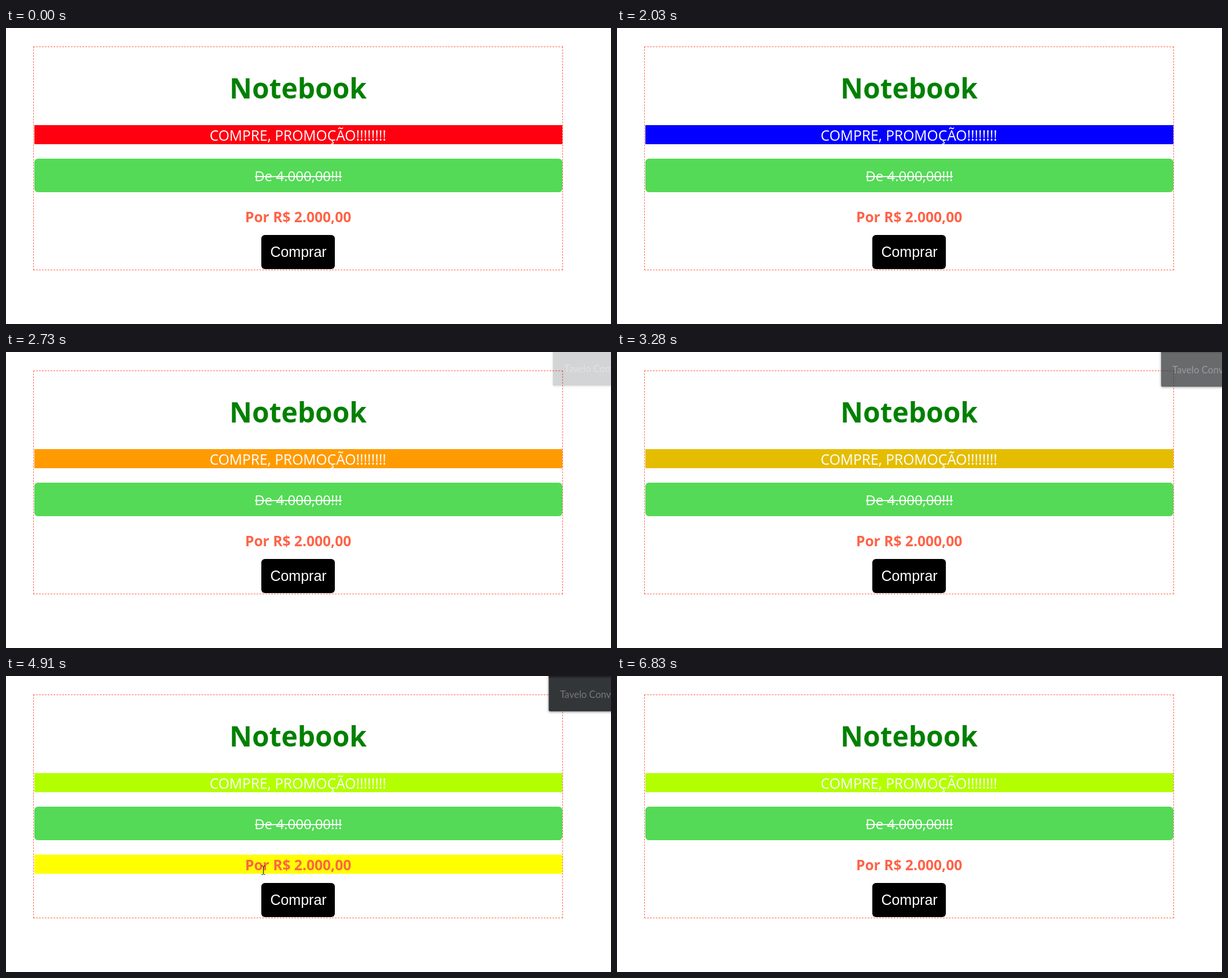
Write an HTML page that moves like this. It is 1045x512 px and loops after 6920 ms.

```html
<!DOCTYPE html>
<html lang="pt-BR">
<head>
<meta charset="utf-8">
<title>Notebook</title>
<style>
  html, body { margin: 0; width: 100%; height: 100%; overflow: hidden; background: #fff; }
  #card { position: absolute; box-sizing: border-box; left: 47px; top: 32px; width: 915px; height: 387px; border: 1px dashed tomato; }
  svg { position: absolute; left: 0; top: 0; }
  text { font-family: "Open Sans", "Noto Sans", sans-serif; font-size: 24.6px; fill: #fff; }
  .word, .label { text-anchor: middle; }
  .bold { font-weight: 700; }
  .label { font-family: "Liberation Sans", Arial, sans-serif; font-size: 25px; }
  #toast text { font-family: Lato, sans-serif; font-size: 16.5px; fill: #75777b; }
</style>
</head>
<body>
<div id="card"></div>
<svg width="1045" height="512" viewBox="0 0 1045 512">
  <text class="word bold" x="504.6" y="121.5" style="font-size:47.9px;fill:green">Notebook</text>

  <rect id="bar" x="49" y="168" width="912" height="33"/>
  <text class="word" x="504.3" y="195">COMPRE, PROMOÇÃO!!!!!!!!</text>

  <rect x="49" y="226" width="912" height="58" rx="6.25" fill="#54da56"/>
  <text class="word" x="504.8" y="265" style="font-size:24px">De 4.000,00!!!</text>
  <rect x="430" y="256" width="150" height="2" fill="#fff"/>

  <rect id="glow" x="49" y="309" width="912" height="33" fill="#ff0"/>
  <text class="word bold" x="504.6" y="336" style="fill:tomato">Por R$ 2.000,00</text>

  <rect id="button" x="441" y="358" width="127" height="59" rx="6.25"/>
  <rect id="hover" x="443" y="360" width="123" height="55" rx="4" fill="#444"/>
  <text class="label" x="505" y="396">Comprar</text>

  <g id="toast">
    <rect x="937.5" y="-10" width="130" height="71" rx="2" fill="#333639" style="filter:drop-shadow(0 1px 2px #0008)"/>
    <rect x="937.5" y="0" width="130" height="3" fill="#232528"/>
    <text x="957" y="37.5">Tavelo Converter</text>
  </g>

  <g id="pointer" stroke-linejoin="round">
    <path id="arrow" d="M.5.5V16L4 12.6 6.5 18.3 8.8 17.3 6.4 11.7H11.5Z" fill="#fff" stroke="#000"/>
    <path id="beam" d="M-3-7.5H-1L0-6.5 1-7.5H3M0-6.5V6.5M-3 7.5H-1L0 6.5 1 7.5H3" fill="none" stroke="#000"/>
    <path id="hand" d="M-1.5 13V2Q0-.5 1.5 2V8Q4 6.5 4.5 8.5 7 7.5 7.5 9.5 10 9 10 11.5V16L8 21.5H-1L-5.5 14Q-5.5 11-1.5 14Z" fill="#fff" stroke="#000"/>
  </g>
  <rect id="blank" width="1045" height="512" fill="#1a1b1c"/>
</svg>
<script>
const LOOP = 6920, FADE = 240;
const $ = id => document.getElementById(id);
const show = (id, on) => $(id).setAttribute('visibility', on ? 'visible' : 'hidden');
const ramp = (t, from, to) => Math.min(1, Math.max(0, (t - from) / (to - from)));
const mix = (a, b, k) => a + (b - a) * k;

const barFades = [
  { at: 1710, to: [4, 0, 255] },
  { at: 2260, to: [255, 155, 0] },
  { at: 3200, to: [179, 255, 0] }
];

// time, x, y at the turning points of each visit
const visits = [
  [[150, 403, 269], [380, 113, 0]],
  [[4060, 520, 87], [4450, 438, 356], [4690, 442, 333], [4910, 444.5, 336], [5060, 444.5, 336],
   [5450, 492, 385], [5830, 492, 385], [5910, 535, 401], [6060, 535, 401], [6450, 880, 482]]
];

function barColour(t) {
  const rgb = barFades.reduce(
    (c, { at, to }) => c.map((v, i) => mix(v, to[i], ramp(t, at, at + FADE))),
    [255, 0, 16]);
  return `rgb(${rgb.map(Math.round)})`;
}

const toastOpacity = t =>
  ramp(t, 2650, 3040) - ramp(t, 3200, 3510) + ramp(t, 3610, 3845) - ramp(t, 5060, 5300);

function pointerAt(t) {
  const visit = visits.find(v => t >= v[0][0] && t < v.at(-1)[0]);
  if (!visit) return null;
  const i = visit.findIndex(p => p[0] > t);
  const [t0, x0, y0] = visit[i - 1], [t1, x1, y1] = visit[i];
  const k = ramp(t, t0, t1);
  return { x: mix(x0, x1, k), y: mix(y0, y1, k) };
}

function over(p, el) {
  const { x, y, width, height } = el.getBBox();
  return p.x >= x && p.x <= x + width && p.y >= y && p.y <= y + height;
}

function drawPointer(p) {
  const onButton = !!p && over(p, $('button'));
  const onText = !!p && [...document.querySelectorAll('.word')].some(el => over(p, el));
  show('hand', onButton);
  show('beam', onText);
  show('arrow', p && !onButton && !onText);
  show('hover', onButton);
  show('glow', p && over(p, $('glow')));
  if (p) $('pointer').setAttribute('transform', `translate(${p.x} ${p.y})`);
}

function drawToast(k) {
  $('toast').setAttribute('opacity', k);
  $('toast').setAttribute('transform', `translate(${9 * (1 - k)} ${-3.5 * (1 - k)})`);
}

function draw(t) {
  $('bar').setAttribute('fill', barColour(t));
  drawToast(toastOpacity(t));
  drawPointer(pointerAt(t));
  show('blank', t >= 1320 && t < 1400);
}

const start = performance.now();
function tick() {
  draw((performance.now() - start) % LOOP);
  requestAnimationFrame(tick);
}
tick();
</script>
</body>
</html>
```
